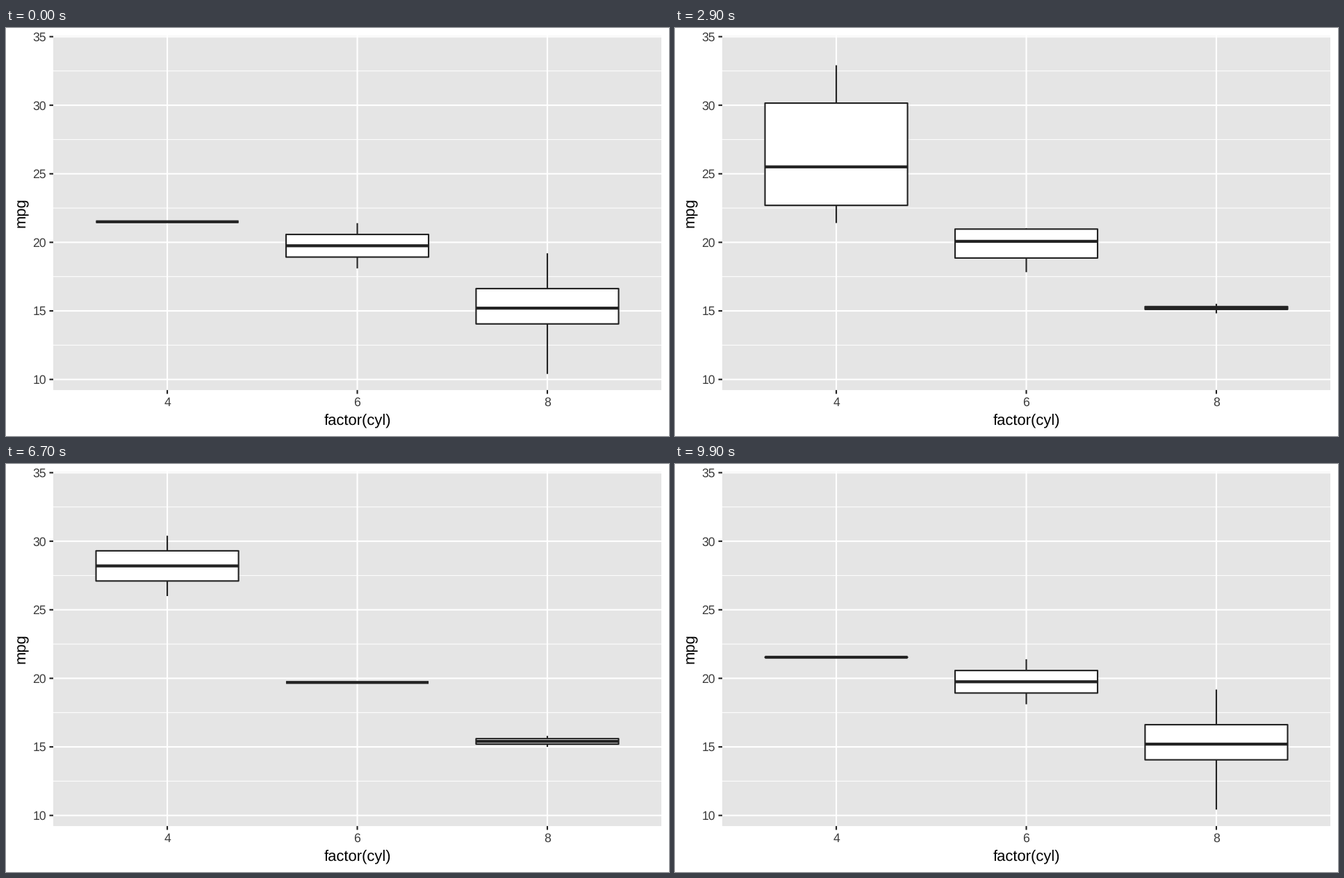
These frames come from a looping animation (954x587 px, 10 s). A matplotlib script:

```python
import math

import matplotlib.pyplot as plt
import numpy as np
from matplotlib.animation import FuncAnimation
from matplotlib.lines import Line2D
from matplotlib.patches import Polygon, Rectangle

W, H, DPI = 954, 587, 64
LEFT, RIGHT, TOP, BOTTOM = 68, 943, 11, 520.9
Y_MIN, Y_MAX = 9.225, 35.075
UNIT = (RIGHT - LEFT) / 3.2
HALF = 0.375 * UNIT
LINE = 2.13
INK, LABEL = "#232323", "#3c3c3c"

plt.rcParams["font.family"] = "Liberation Sans"
plt.rcParams["text.hinting"] = "none"
plt.rcParams["path.snap"] = False

# mpg by number of gears, then by number of cylinders
MPG = [
    {4: [21.5], 6: [21.4, 18.1],
     8: [18.7, 14.3, 16.4, 17.3, 15.2, 10.4, 10.4, 14.7, 15.5, 15.2, 13.3, 19.2]},
    {4: [22.8, 24.4, 22.8, 32.4, 30.4, 33.9, 27.3, 21.4], 6: [21, 21, 19.2, 17.8]},
    {4: [26, 30.4], 6: [19.7], 8: [15.8, 15.0]},
]
STATS = [{c: np.percentile(v, [0, 25, 50, 75, 100]) for c, v in g.items()} for g in MPG]

# first and last frame of each move to the next state
MOVES = [(11, 33), (45, 67), (79, 100)]


def px(slot):
    return LEFT + (slot - 0.4) * UNIT


def py(v):
    return TOP + (Y_MAX - v) / (Y_MAX - Y_MIN) * (BOTTOM - TOP)


fig = plt.figure(figsize=(W / DPI, H / DPI), dpi=DPI, facecolor="white")
ax = fig.add_axes([0, 0, 1, 1])
ax.set_xlim(0, W)
ax.set_ylim(H, 0)
ax.axis("off")


def line(xs, ys, color, width, z):
    return ax.add_line(Line2D(xs, ys, color=color, lw=width * 72 / DPI, zorder=z,
                              solid_capstyle="butt", snap=False))


def text(x, y, s, size, color, ha="center", rotation=0):
    ax.text(x, y, s, fontsize=size * 72 / DPI, color=color, ha=ha, va="baseline",
            rotation=rotation, rotation_mode="anchor")


def draw_panel():
    panel = ax.add_patch(Rectangle((LEFT, TOP), RIGHT - LEFT, BOTTOM - TOP,
                                   fc="#e5e5e5", ec="none", zorder=0, snap=False))
    for v in np.arange(12.5, 35, 5):
        line([LEFT, RIGHT], [py(v)] * 2, "white", LINE / 2, 1)
    for v in range(10, 36, 5):
        y = py(v)
        line([LEFT, RIGHT], [y, y], "white", LINE, 2).set_clip_path(panel)
        line([LEFT - 5.5, LEFT], [y, y], INK, LINE, 2)
        text(LEFT - 9.9, y + 6.3, str(v), 17.6, LABEL, ha="right")
    for slot, cyl in enumerate((4, 6, 8), 1):
        x = px(slot)
        line([x, x], [TOP, BOTTOM], "white", LINE, 2)
        line([x, x], [BOTTOM, BOTTOM + 5.5], INK, LINE, 2)
        text(x, 544.2, str(cyl), 17.6, LABEL)
    text((LEFT + RIGHT) / 2, 571, "factor(cyl)", 22, "black")
    text(27.7, (TOP + BOTTOM) / 2, "mpg", 22, "black", rotation=90)


class Box:
    def __init__(self, slot):
        self.x = px(slot)
        self.low = line([self.x] * 2, [0, 0], INK, LINE, 3)
        self.high = line([self.x] * 2, [0, 0], INK, LINE, 3)
        self.body = ax.add_patch(Polygon(np.zeros((4, 2)), closed=True, fc="white", ec=INK,
                                         lw=LINE * 72 / DPI, joinstyle="round",
                                         zorder=4, snap=False))
        self.mid = line([self.x - HALF, self.x + HALF], [0, 0], INK, 2 * LINE, 5)
        self.parts = [self.low, self.high, self.body, self.mid]

    def show(self, stats, alpha):
        for part in self.parts:
            part.set_visible(stats is not None)
            part.set_alpha(alpha)
        if stats is None:
            return
        lo, q1, med, q3, hi = (py(v) for v in stats)
        l, r = self.x - HALF, self.x + HALF
        self.low.set_ydata([q1, lo])
        self.high.set_ydata([q3, hi])
        self.mid.set_ydata([med, med])
        self.body.set_xy([(l, q3), (l, q1), (r, q1), (r, q3)])


def progress(i):
    """State being left, and the eased share of the way to the next one."""
    for state, (start, end) in enumerate(MOVES):
        if i < end:
            t = max(0, (i - start) / (end - start))
            return state, (1 - math.cos(math.pi * t)) / 2


def blend(a, b, k):
    """Boxes leave by shrinking to the median and enter by fading in."""
    if a is None:
        return (b, k) if k > 0 else (None, 1)
    if b is None:
        b = np.full(5, a[2])
    return a + (b - a) * k, 1


draw_panel()
boxes = {cyl: Box(slot) for slot, cyl in enumerate((4, 6, 8), 1)}


def update(i):
    state, k = progress(i)
    here, there = STATS[state], STATS[(state + 1) % len(STATS)]
    for cyl, box in boxes.items():
        box.show(*blend(here.get(cyl), there.get(cyl), k))
    return [part for box in boxes.values() for part in box.parts]


anim = FuncAnimation(fig, update, frames=100, interval=100, repeat=True,
                     init_func=lambda: update(0), blit=False)
plt.show()
```
